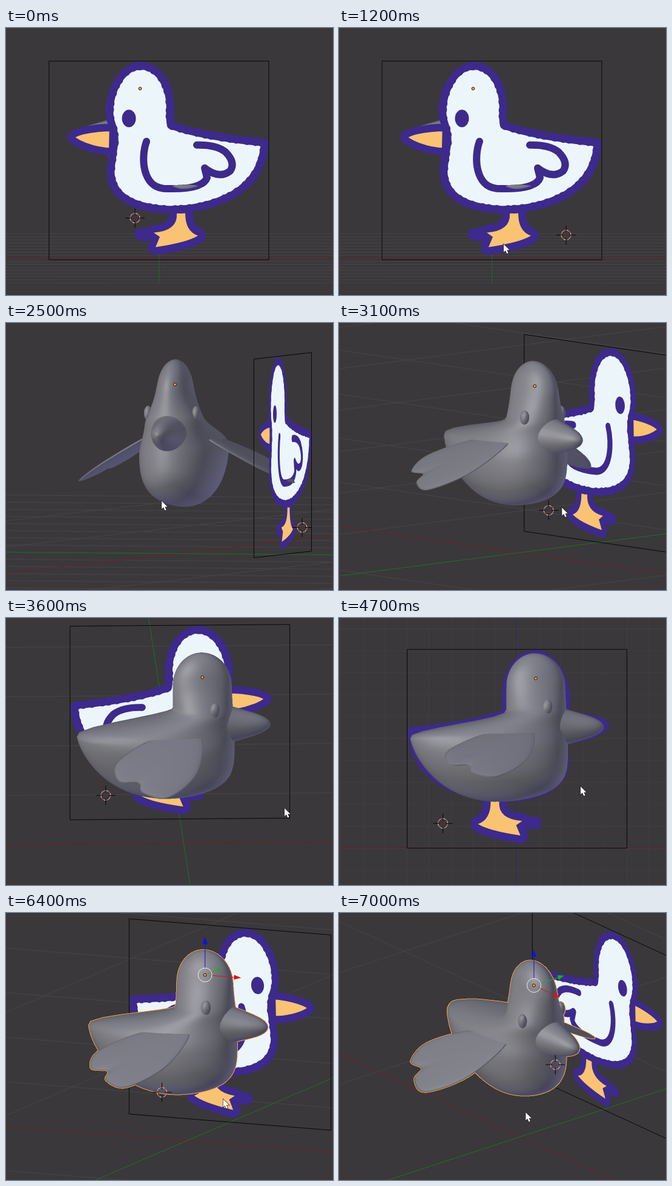
These frames come from a looping animation (540 px wide and 442 px high, 7100 ms). An HTML page with a canvas:

```html
<!DOCTYPE html>
<html lang="en">
<head>
<meta charset="utf-8">
<title>Duck model turntable</title>
<style>
html, body { margin: 0; width: 100%; height: 100%; overflow: hidden; background: #3a383a; }
canvas { display: block; }
</style>
</head>
<body>
<canvas id="stage" width="540" height="442"></canvas>
<script>
const W = 540, H = 442, LOOP = 7100, STEP = 100;
const SS = 2, BW = W * SS, BH = H * SS;      // supersampled model buffer
const UNIT = 363, GRID = 8, PLANE_Y = 180, MODEL_Y = 4;
const PIVOT = [-20.75, -16, 160], CENTER = [273.25, 221];
const ORIGIN = [31, MODEL_Y, 281];
const PURPLE = '#3d2a8c', WHITE = '#ecf6fa', ORANGE = '#fac373';
const ctx = document.getElementById('stage').getContext('2d');

/* ---- motion ---- */
// time, azimuth, elevation
const VIEW = [[1600, 180, .8], [2500, 105.2, 1.8], [3600, -2, 13], [4100, -2, 13],
  [4300, 0, 0], [5870, 0, 0], [7000, 49.8, 22.9]];
// time, x, y while no drag is going on
const POINTER = [[100, 470, 432], [400, 375, 342], [1200, 272, 358], [1600, 115, 293],
  [3600, 460, 315], [4700, 399, 279], [5200, 330, 190], [5700, 403, 289]];

function tween(keys, t) {
  const i = keys.findIndex(k => k[0] > t);
  if (i <= 0) return keys[i ? keys.length - 1 : 0].slice(1);
  const a = keys[i - 1], b = keys[i], f = (t - a[0]) / (b[0] - a[0]);
  return a.map((v, n) => v + (b[n] - v) * f).slice(1);
}

// Dragging turns the view in proportion to the pointer's travel.
function pointerAt(t, azimuth, elevation) {
  const drag = (x, y, a, e) => [x + 1.9 * (a - azimuth), y + 1.8 * (elevation - e)];
  if (t >= 1600 && t < 3600) return drag(115, 293, 180, .8);
  if (t >= 5800) return drag(403, 289, 0, 0);
  return tween(POINTER, t);
}

/* ---- flat reference drawing ---- */
const bird = new Path2D('M222 62C250 62 270 90 271 130Q270 150 272 160Q325 179 427 189Q425 245 375 275' +
  'Q330 300 270 300Q172 296 173 235Q174 222 179 190Q181 175 172 150C166 110 190 62 222 62Z');
const bill = new Path2D('M177 164C140 164 107 172 107 180S145 204 176 204Z');
const wingLine = new Path2D('M232 187C222 215 226 262 260 265Q325 268 332 247L328 231' +
  'Q352 250 370 236Q380 222 362 204Q346 192 315 193');
const foot = new Path2D('M282 306Q284 335 244 338L254 345L247 362Q300 354 317 343Q296 336 296 306Z');
const toe = new Path2D('M250 341H223');
const frame = new Path2D('M71 54H434V383H71Z');

function stroke(path, width, color, dash = []) {
  ctx.lineWidth = width;
  ctx.strokeStyle = color;
  ctx.setLineDash(dash);
  ctx.stroke(path);
  ctx.setLineDash([]);
}

function fill(path, color) {
  ctx.fillStyle = color;
  ctx.fill(path);
}

function drawPicture() {
  const at = (x, y) => project([252.5 - x, PLANE_Y, 383 - y]);
  const o = at(0, 0), u = at(1, 0), v = at(0, 1);
  const matrix = new DOMMatrix([u.x - o.x, u.y - o.y, v.x - o.x, v.y - o.y, o.x, o.y]);
  ctx.save();
  ctx.setTransform(matrix);
  ctx.lineCap = ctx.lineJoin = 'round';
  stroke(foot, 26, PURPLE);
  stroke(toe, 21, PURPLE);
  fill(foot, ORANGE);
  fill(bill, ORANGE);
  stroke(bill, 12.5, PURPLE);
  fill(bird, WHITE);
  stroke(bird, 12.5, PURPLE);
  stroke(bird, 14.5, PURPLE, [0, 14, 0, 10, 0, 18]);   // ragged edge
  stroke(wingLine, 12, PURPLE);
  const eye = new Path2D();
  eye.ellipse(203, 149, 11.5, 14.5, 0, 0, 7);
  fill(eye, PURPLE);
  ctx.restore();
  const border = new Path2D();
  border.addPath(frame, matrix);
  stroke(border, 1, '#080808');
}

/* ---- model, built from side-view pixels (x, y) plus depth ---- */
const world = (x, depth, y) => [x - 294, depth + MODEL_Y, 381 - y];
const steps = (n, make) => Array.from({ length: n + 1 }, (_, i) => make(i / n));
const ring = (n, make) => steps(n - 1, t => {
  const a = t * (n - 1) / n * 2 * Math.PI;
  return make(Math.cos(a), Math.sin(a));
});
const clamp = v => Math.max(0, Math.min(1, v));
const smooth = (from, to, v) => {
  const s = clamp((v - from) / (to - from));
  return s * s * (3 - 2 * s);
};
const vertices = [], triangles = [];

function addSurface(rows) {
  const n = rows[0].length, grid = rows.map(r => r.map(p => ({ p, n: [0, 0, 0] })));
  const all = grid.flat(), tris = [];
  for (let i = 0; i + 1 < grid.length; i++)
    for (let j = 0; j < n; j++) {
      const k = (j + 1) % n, a = grid[i][j], b = grid[i][k], c = grid[i + 1][j], d = grid[i + 1][k];
      tris.push([a, b, c], [b, d, c]);
    }
  for (const t of tris) {
    const [a, b, c] = t.map(v => v.p);
    const e = a.map((v, i) => b[i] - v), f = a.map((v, i) => c[i] - v);
    const cross = [e[1] * f[2] - e[2] * f[1], e[2] * f[0] - e[0] * f[2], e[0] * f[1] - e[1] * f[0]];
    t.forEach(v => cross.forEach((q, i) => v.n[i] += q));
  }
  const mid = [0, 1, 2].map(i => all.reduce((s, v) => s + v.p[i], 0) / all.length);
  const outward = Math.sign(all.reduce((s, v) => s + v.n.reduce((q, c, i) => q + c * (v.p[i] - mid[i]), 0), 0));
  for (const v of all) {
    const len = outward * Math.hypot(...v.n) || 1;
    v.n = v.n.map(c => c / len);
  }
  vertices.push(...all);
  triangles.push(...tris);
}

// Body: horizontal slices with a domed head, a tail pulled backwards and a rounded belly.
addSurface(steps(64, t => {
  const y = 58 + 123 * (1 - Math.cos(t * Math.PI));
  const dome = Math.sqrt(1 - (1 - clamp((y - 58) / 55)) ** 2);
  const tail = smooth(153, 197, y), grow = smooth(95, 220, y), q = clamp((y - 196) / 108);
  const back = 265 + (58 - 47 * dome - 159 * tail) * (1 - q ** 1.5) ** .45;
  const front = 265 + (58 + 50 * dome + 5 * grow) * (1 - q ** 5) ** .6;
  const half = (29 * dome + 39 * grow) * Math.sqrt(1 - q ** 3);
  return ring(48, (c, s) => world((back + front) / 2 + c * (front - back) / 2, s * half * (1 + .2 * c * tail), y));
}));

// Beak: half an ellipsoid flaring into the head.
addSurface(steps(18, t => {
  const x = 350 + 87 * Math.sin(t * Math.PI / 2), s = (x - 350) / 87;
  const r = Math.sqrt(1 - s * s) + .5 * (1 - s) ** 3;
  return ring(28, (c, k) => world(x, 24 * r * c, 180 + 26 * r * k));
}));

// Closed Catmull-Rom through a few points
function loop(points, n) {
  const at = i => points[(i + points.length) % points.length];
  return points.flatMap((b, i) => steps(n - 1, s => {
    const t = s * (n - 1) / n, [a, c, d] = [at(i - 1), at(i + 1), at(i + 2)];
    return b.map((v, k) => v + .5 * t * (c[k] - a[k] +
      t * (2 * a[k] - 5 * v + 4 * c[k] - d[k] + t * (3 * (v - c[k]) + d[k] - a[k]))));
  }));
}

const WING = loop([[318, 186], [312, 232], [262, 262.5], [220, 256], [214, 244], [182, 242], [180, 219], [245, 190]], 7);
for (const side of [-1, 1]) {
  // Wing: a thin lens on a plane sloping down and outwards
  addSurface(steps(12, t => {
    const scale = Math.sin(t * Math.PI), lift = 5 * Math.cos(t * Math.PI);
    return WING.map(([wx, wy]) => {
      const x = 258 + (wx - 258) * scale, y = 222 + (wy - 222) * scale;
      return world(x, side * (57 + 1.75 * (y - 191) + lift * .48), y - lift * .87);
    });
  }));
  // Eye
  addSurface(steps(8, t => {
    const r = Math.sin(t * Math.PI);
    return ring(18, (c, s) => world(344 + 8.5 * r * c, side * 41 + 7 * r * s, 147 - 12.5 * Math.cos(t * Math.PI)));
  }));
}

/* ---- camera, light and rasteriser ---- */
let cosA, sinA, cosE, sinE;

function setView(azimuth, elevation) {
  const r = Math.PI / 180;
  [cosA, sinA, cosE, sinE] = [Math.cos(azimuth * r), Math.sin(azimuth * r), Math.cos(elevation * r), Math.sin(elevation * r)];
}

function turn([x, y, z]) {
  const d = y * cosA - x * sinA;
  return { x: x * cosA + y * sinA, y: z * cosE + d * sinE, z: d * cosE - z * sinE };
}

function project(p) {
  const v = turn(p.map((c, i) => c - PIVOT[i]));
  return { x: CENTER[0] + v.x, y: CENTER[1] - v.y, z: v.z };
}

// direction towards light, colour
const LIGHTS = [[-.685, .23, .69, 84, 84, 87], [.747, .584, .315, 36, 36, 47], [.43, -.79, -.43, 45, 43, 74]];

function shade(n) {
  const v = turn(n), color = [46, 46, 49];
  for (const [x, y, z, ...rgb] of LIGHTS) {
    const lit = Math.max(0, v.x * x + v.y * y - v.z * z);
    rgb.forEach((c, i) => color[i] += c * lit);
  }
  const shine = 32 * Math.max(0, -.373 * v.x + .125 * v.y - .919 * v.z) ** 24;
  return color.map(c => c + shine);
}

function makeLayer() {
  const canvas = document.createElement('canvas');
  canvas.width = BW;
  canvas.height = BH;
  const c = canvas.getContext('2d');
  return { canvas, c, image: c.createImageData(BW, BH) };
}
const behind = makeLayer(), front = makeLayer(), tint = makeLayer();
const depth = new Float32Array(BW * BH);

function rasterize(a, b, c) {
  const bx = b.x - a.x, by = b.y - a.y, cx = c.x - a.x, cy = c.y - a.y, det = bx * cy - cx * by;
  if (Math.abs(det) < 1e-6) return;
  const x0 = Math.max(0, Math.ceil(Math.min(a.x, b.x, c.x))), x1 = Math.min(BW - 1, Math.max(a.x, b.x, c.x));
  const y0 = Math.max(0, Math.ceil(Math.min(a.y, b.y, c.y))), y1 = Math.min(BH - 1, Math.max(a.y, b.y, c.y));
  for (let y = y0; y <= y1; y++)
    for (let x = x0; x <= x1; x++) {
      const px = x - a.x, py = y - a.y;
      const u = (px * cy - cx * py) / det, v = (bx * py - px * by) / det, w = 1 - u - v;
      if (u < 0 || v < 0 || w < -1e-9) continue;
      const z = w * a.z + u * b.z + v * c.z, i = y * BW + x;
      if (z >= depth[i]) continue;
      depth[i] = z;
      const nearer = (w * a.p[1] + u * b.p[1] + v * c.p[1] < PLANE_Y) === cosA > 0;
      const on = (nearer ? front : behind).image.data, off = (nearer ? behind : front).image.data;
      for (let k = 0; k < 3; k++) on[4 * i + k] = w * a.color[k] + u * b.color[k] + v * c.color[k];
      on[4 * i + 3] = 255;
      off[4 * i + 3] = 0;
    }
}

function renderModel() {
  depth.fill(1e9);
  behind.image.data.fill(0);
  front.image.data.fill(0);
  for (const v of vertices) {
    const s = project(v.p);
    v.x = s.x * SS;
    v.y = s.y * SS;
    v.z = s.z;
    v.color = shade(v.n);
  }
  triangles.forEach(t => rasterize(...t));
  for (const l of [behind, front]) l.c.putImageData(l.image, 0, 0);
}

function drawOutline() {
  const c = tint.c;
  c.globalCompositeOperation = 'copy';
  c.drawImage(front.canvas, 0, 0);
  c.globalCompositeOperation = 'source-in';
  c.fillStyle = '#f0a04e';
  c.fillRect(0, 0, BW, BH);
  ring(8, (x, y) => ctx.drawImage(tint.canvas, x, y, W, H));
}

/* ---- viewport furniture ---- */
function line(x1, y1, x2, y2, color) {
  const path = new Path2D();
  path.moveTo(x1, y1);
  path.lineTo(x2, y2);
  stroke(path, 1, color);
}

function line3(p, q, color) {
  const a = project(p), b = project(q);
  line(a.x, a.y, b.x, b.y, color);
}

function drawFloor() {
  const far = GRID * UNIT;
  for (let k = -GRID; k <= GRID; k++) {
    line3([-far, k * UNIT, 0], [far, k * UNIT, 0], '#474547');
    line3([k * UNIT, -far, 0], [k * UNIT, far, 0], '#474547');
  }
  line3([-far, 0, 0], [far, 0, 0], '#6c1c26');
  line3([0, -far, 0], [0, far, 0], '#1d6b2a');
}

function drawSideGrid() {
  const cell = UNIT / 10;
  for (let k = -12; k <= 12; k++) {
    const color = k % 10 ? '#403e40' : '#474547';
    line(294 + k * cell, 0, 294 + k * cell, H, color);
    line(0, 381 + k * cell, W, 381 + k * cell, color);
  }
  line(0, 380.5, W, 380.5, '#6c1c26');
  line(293.5, 0, 293.5, H, '#2c2668');
}

function circle(x, y, r) {
  const path = new Path2D();
  path.arc(x, y, r, 0, 7);
  return path;
}

function drawGizmo() {
  const o = project(ORIGIN);
  const arrowAlong = (axis, color) => {
    const d = turn(axis), len = Math.hypot(d.x, d.y);
    if (len < .1) return;
    const at = (s, aside = 0) => [o.x + d.x * s + d.y / len * aside, o.y - d.y * s + d.x / len * aside];
    line(...at(12), ...at(54), color);
    const head = new Path2D();
    head.moveTo(...at(65));
    head.lineTo(...at(52, 4));
    head.lineTo(...at(52, -4));
    fill(head, color);
  };
  arrowAlong([0, 1, 0], '#18b018');
  arrowAlong([1, 0, 0], '#e01010');
  arrowAlong([0, 0, 1], '#1010e8');
  stroke(circle(o.x, o.y, 11.5), 1, '#f0f0f0');
}

function drawOrigin() {
  const o = project(ORIGIN), dot = circle(o.x, o.y, 2.4);
  fill(dot, '#f0a050');
  stroke(dot, 1, '#1c1208');
}

function drawCursor3d(t) {
  const { x, y } = project(t < 400 ? [39.5, PLANE_Y, 69] : [-122.5, PLANE_Y, 41]);
  const rim = circle(x, y, 8);
  stroke(rim, 1, '#f0e8e8');
  stroke(rim, 1, '#d82020', [4, 4.4]);
  ring(4, (dx, dy) => line(x + 5 * dx, y + 5 * dy, x + 16 * dx, y + 16 * dy, '#050505'));
}

const arrow = new Path2D('M0 0V13L3 10.3L5.2 15.5L7.5 14.5L5.3 9.5H9.5Z');

function drawPointer(x, y) {
  ctx.save();
  ctx.translate(x, y);
  stroke(arrow, 1.4, '#222');
  fill(arrow, '#fff');
  ctx.restore();
}

function draw(t) {
  const [azimuth, elevation] = tween(VIEW, t);
  const selected = t >= 5200;
  setView(azimuth, elevation);
  ctx.fillStyle = '#3a383a';
  ctx.fillRect(0, 0, W, H);
  if (t >= 4300 && t < 5900) drawSideGrid();
  else drawFloor();
  renderModel();
  ctx.drawImage(behind.canvas, 0, 0, W, H);
  drawPicture();
  if (selected) drawOutline();
  ctx.drawImage(front.canvas, 0, 0, W, H);
  if (selected) drawGizmo();
  drawOrigin();
  drawCursor3d(t);
  if (t >= 100) drawPointer(...pointerAt(t, azimuth, elevation));
}

const start = performance.now();
let shown = -1;
function tick() {
  const t = Math.floor((performance.now() - start) % LOOP / STEP) * STEP;
  if (t !== shown) draw(shown = t);
  requestAnimationFrame(tick);
}
tick();
</script>
</body>
</html>
```
